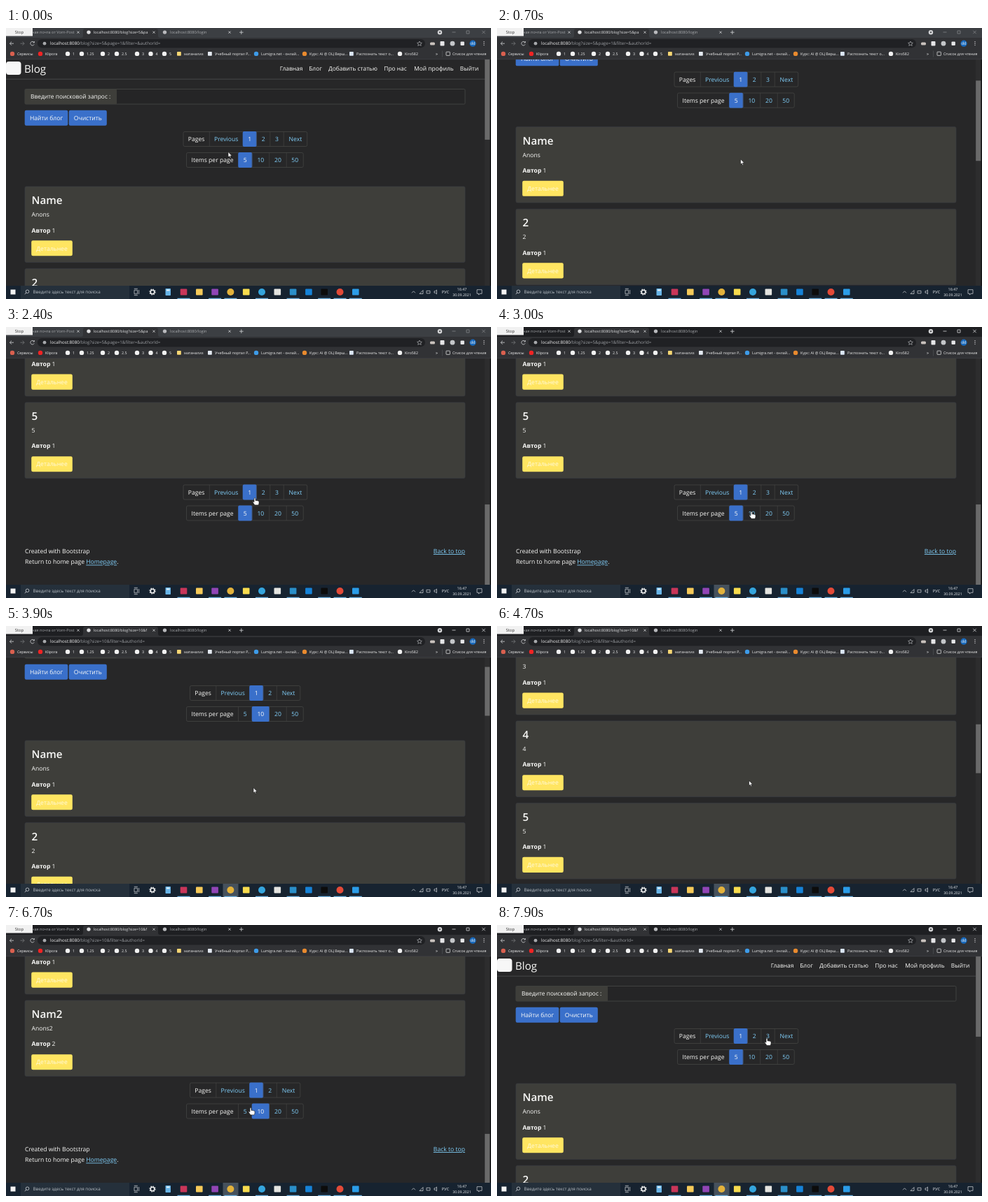
Recreate the animation shown at these times as an HTML page. Size 692 px wide and 388 px high, loop 8 s.

```html
<!DOCTYPE html>
<html lang="ru">
<head>
<meta charset="utf-8">
<title>Blog</title>
<style>
html, body { margin: 0; width: 100%; height: 100%; overflow: hidden; background: #272728; }
svg { display: block; width: 692px; height: 388px; font-family: "Open Sans", "Noto Sans", sans-serif; text-rendering: geometricPrecision; }
text { white-space: pre; }
</style>
</head>
<body>
<svg id="stage" viewBox="0 0 692 388"></svg>
<script>
const LOOP = 8000, STEP = 100;
const TOP = 45, BOTTOM = 369, VIEW = BOTTOM - TOP;
const CARD_TOP = 227, PITCH = 117.6;
const BODY = 8.6;
const BLUE = '#3a70ca', LINK = '#80cffa', WHITE = '#fafaf8', EDGE = '#484947', CARD = '#3e3e3a';
const stage = document.getElementById('stage');

function el(parent, tag, attrs = {}) {
  const node = document.createElementNS('http://www.w3.org/2000/svg', tag);
  for (const key in attrs) node.setAttribute(key, attrs[key]);
  parent.appendChild(node);
  return node;
}
const group = (parent, attrs) => el(parent, 'g', attrs);
const rect = (g, x, y, width, height, fill, rx = 0, more = {}) =>
  el(g, 'rect', { x, y, width, height, fill, rx, ...more });
const dot = (g, cx, cy, r, fill) => el(g, 'circle', { cx, cy, r, fill });
const line = (g, d, stroke = '#d5d6d8', width = 0.8) =>
  el(g, 'path', { d, stroke, 'stroke-width': width, fill: 'none' });
function text(g, value, x, y, size = BODY, fill = WHITE, more = {}) {
  const node = el(g, 'text', { x, y, 'font-size': size, fill, ...more });
  node.textContent = value;
  return node;
}
const MID = { 'text-anchor': 'middle' };

// Page content

function pager(g, y, x, cells, active) {
  const left = x;
  const width = cells.reduce((sum, cell) => sum + cell[1], 0);
  rect(g, left, y, width, 21, 'none', 2, { stroke: EDGE, 'stroke-width': 0.7 });
  cells.forEach(([label, w], i) => {
    const on = label === active;
    if (on) rect(g, x - 0.3, y - 0.4, w + 0.6, 21.8, BLUE, 2);
    else if (i) line(g, `M${x} ${y}v21`, EDGE, 0.6);
    text(g, label, x + w / 2, y + 13.6, BODY, i && !on ? LINK : WHITE, MID);
    x += w;
  });
}

function pagers(g, y, size) {
  const pages = size === 5 ? ['1', '2', '3'] : ['1', '2'];
  pager(g, y, size === 5 ? 253 : 262.5,
    [['Pages', 37.3], ['Previous', 47.7], ...pages.map(p => [p, 19.4]), ['Next', 33.5]], '1');
  pager(g, y + 30, 257.5,
    [['Items per page', 74], ['5', 19.5], ['10', 24.7], ['20', 24.5], ['50', 24]], String(size));
}

function button(g, label, x, y, width, fill, color = WHITE) {
  rect(g, x - 0.3, y - 0.3, width + 0.6, 22.1, fill, 2.2);
  text(g, label, x + width / 2, y + 14, BODY, color, MID);
}

function card(g, y, title, intro, author) {
  rect(g, 27, y, 628, 108.5, CARD, 2, { stroke: '#393d43', 'stroke-width': 0.6 });
  text(g, title, 36.5, y + 25, 15.2, WHITE, { 'font-weight': 600 });
  text(g, intro, 36.5, y + 43);
  const by = text(g, '', 36.5, y + 65.5);
  el(by, 'tspan', { 'font-weight': 700 }).textContent = 'Автор';
  by.append(' ' + author);
  button(g, 'Детальнее', 36.5, y + 77.5, 58, '#ffe561', '#fffae0');
}

function buildPage(parent, size) {
  const g = group(parent);
  rect(g, 0, 48, 21.5, 19, '#f7f7f7', 4);
  text(g, 'Blog', 26, 63.5, 15.2);
  [['Главная', 407], ['Блог', 441.5], ['Добавить статью', 495], ['Про нас', 555.5],
   ['Мой профиль', 610.5], ['Выйти', 661]].forEach(([label, x]) => text(g, label, x, 61, 8.4, WHITE, MID));
  line(g, 'M0 73.2H683', '#55565a', 0.7);

  rect(g, 27, 87.5, 628, 21.5, '#252526', 1.5, { stroke: EDGE, 'stroke-width': 0.8 });
  rect(g, 27, 87.5, 131, 21.5, CARD, 1.5);
  text(g, 'Введите поисковой запрос :', 92.2, 101.3, 8.4, WHITE, MID);
  button(g, 'Найти блог', 27, 118, 61, BLUE);
  button(g, 'Очистить', 90, 118, 53.5, BLUE);
  pagers(g, 148.5, size);

  for (let i = 0; i < size; i++) {
    const y = CARD_TOP + PITCH * i, n = String(i + 1);
    if (i === 0) card(g, y, 'Name', 'Anons', 1);
    else if (i === 9) card(g, y, 'Nam2', 'Anons2', 2);
    else card(g, y, n, n, 1);
  }
  const last = CARD_TOP + PITCH * (size - 1);
  pagers(g, last + 118, size);
  const under = { 'text-decoration': 'underline' };
  text(g, 'Created with Bootstrap', 27, last + 216);
  text(g, 'Back to top', 655, last + 216, BODY, LINK, { ...under, 'text-anchor': 'end' });
  const home = text(g, 'Return to home page ', 27, last + 231.5);
  el(home, 'tspan', { fill: LINK, ...under }).textContent = 'Homepage';
  home.append('.');
  return g;
}

// Browser frame

function buildBrowser(g) {
  const strip = rect(g, 0, 0, 692, 14, '#1e1f22');
  rect(g, 0, 14, 692, 31, '#313235');
  el(g, 'path', { d: 'M107 14q3 0 3-3V4q0-3 3-3H214q3 0 3 3v7q0 3 3 3Z', fill: '#313235' });
  text(g, 'ная почта от Vorn-Post', 37, 8.1, 5.5, '#a7a9ac');
  text(g, 'localhost:8080/login', 234, 8.1, 5.6, '#a7a9ac');
  dot(g, 118, 6.1, 2.7, '#dfe0e2');
  dot(g, 226.5, 6.1, 2.7, '#b9babd');
  const cross = (parent, x, y, r) =>
    line(parent, `M${x - r} ${y - r}l${2 * r} ${2 * r}m0 ${-2 * r}l${-2 * r} ${2 * r}`);
  [103, 211, 319].forEach(x => cross(g, x, 6.2, 1.6));
  line(g, 'M333 6.2h5.6m-2.8-2.8v5.6');
  const controls = group(g);
  line(controls, 'M636.5 6h5M657 4h4v4h-4Z');
  cross(controls, 681.5, 6, 2.2);
  dot(g, 619, 6.3, 3.2, '#d5d6d8');
  el(g, 'path', { d: 'M617.5 5.4h3l-1.5 2Z', fill: '#1e1f22' });

  rect(g, 45, 16, 553, 12.4, '#202124', 6.2);
  line(g, 'M11 22.2H5.5m2.5-2.6l-2.6 2.6 2.6 2.6');
  line(g, 'M20.5 22.2H26m-2.5-2.6l2.6 2.6-2.6 2.6', '#77797c');
  line(g, 'M40 20.6a2.8 2.8 0 1 0 .2 2.8M40.4 19v2h-2');
  dot(g, 55, 22.2, 2.4, '#a7a9ac');
  el(g, 'path', { d: 'M590 19l1 2.2 2.4.2-1.8 1.6.6 2.4-2.2-1.3-2.2 1.3.6-2.4-1.8-1.6 2.4-.2Z', fill: 'none', stroke: '#c5c7ca', 'stroke-width': 0.6 });
  rect(g, 605, 20.5, 7, 4, '#c9c2bd', 1.5);
  rect(g, 619.5, 19, 6, 6.5, '#e6e6e8', 1);
  dot(g, 637, 22.2, 3.4, '#c5c7ca');
  rect(g, 648.5, 19.5, 5.4, 5.4, '#e6e6e8', 1);
  dot(g, 666, 22.2, 4.6, '#1769bd');
  text(g, 'dd', 666, 24.2, 5.8, WHITE, MID);
  [19.8, 22.2, 24.6].forEach(y => dot(g, 682, y, 0.7, '#d5d6d8'));

  [['Сервисы', 16, '#d9604f'], ['Klipora', 56, '#f02424'], ['1', 95, ''], ['1.25', 115, ''], ['2', 145, ''],
   ['2.5', 165, ''], ['3', 194, ''], ['4', 213.5, ''], ['5', 233, ''], ['матанализ', 254, '#f7d774'],
   ['Учебный портал P...', 298, '#e4eaf2'], ['Lumigra.net - онлай...', 364, '#3e9be8'],
   ['Курс: AI @ ОЦ Верш...', 433, '#e98a2e'], ['Распознать текст о...', 500, '#dbe6f7'],
   ['Kiro582', 569, '#f1f1f1']].forEach(([label, x, color]) => {
    if (x === 254 || x === 298 || x === 500) rect(g, x - 10, 34, 5.8, 5.8, color, 0.8);
    else dot(g, x - 7, 36.9, 3.2, color || '#f1f1f1');
    text(g, label, x, 38.6, 5.3, '#f1f1f1');
  });
  text(g, '»', 613, 38.5, 6, '#f1f1f1');
  line(g, 'M622.5 32.5v9', '#55565a', 0.6);
  rect(g, 628, 34.2, 5.4, 5.2, 'none', 0.6, { stroke: '#f1f1f1', 'stroke-width': 0.7 });
  text(g, 'Список для чтения', 637, 38.6, 5.3, '#f1f1f1');
  line(g, 'M0 44.8H692', '#46474a', 0.5);

  rect(g, 0, 0, 38, 11.5, '#f1f1f1');
  text(g, 'Stop', 19, 7.7, 5.8, '#333', MID);
  return { strip, controls };
}

function buildTaskbar(g) {
  rect(g, 0, BOTTOM, 692, 19, '#172330');
  rect(g, 6.5, 374.5, 7, 7, '#f3f3f3');
  rect(g, 21, BOTTOM, 155, 19, '#25303b');
  el(g, 'circle', { cx: 30.5, cy: 377.3, r: 2.3, fill: 'none', stroke: '#d0d4d8', 'stroke-width': 0.8 });
  line(g, 'M28.8 379l-2 2.2');
  text(g, 'Введите здесь текст для поиска', 38.5, 380.3, 6.3, '#b9bfc5');
  line(g, 'M183 375.3h4.5v5.4H183ZM189.6 375v6M182.8 373.3h5M182.8 382.7h5', '#d8dbde', 0.7);
  const active = rect(g, 309.5, BOTTOM, 22, 19, '#46515c');
  el(g, 'circle', { cx: 209, cy: 378, r: 2.8, fill: 'none', stroke: '#f1f1f1', 'stroke-width': 1.5 });
  el(g, 'circle', { cx: 209, cy: 378, r: 4, fill: 'none', stroke: '#f1f1f1', 'stroke-width': 1.2, 'stroke-dasharray': '1.5 1.64' });
  rect(g, 227.5, 373, 7.5, 10, '#69b5e8', 0.8);
  rect(g, 229, 374.4, 4.5, 2, '#e8f3fb');
  ['#c93659', '#f6ca59', '#9145b6', '#e3b23c', '#f8dc4e', '#35a5dd', '#e4e4e0', '#2a8fc9',
   '#1683d8', '#0c0c0c', '#e34a38', '#2b9de8'].forEach((color, i) => {
    const x = 253.5 + 22.3 * i;
    if ([3, 5, 10].includes(i)) dot(g, x, 378, 5, color);
    else rect(g, x - 4.8, 373.4, 9.6, 9.2, color, 1);
    if ([0, 2, 3, 5, 7, 9, 10, 11].includes(i)) rect(g, x - 9, 386.8, 18, 1.2, '#72b6e4');
  });
  line(g, 'M579 379.3l2.5-2.5 2.5 2.5M590 380.5l5-5v5ZM600 376.3h5v3.6h-5ZM611 376.8h1.5l2-1.7v5.8l-2-1.7H611Z', '#d8dbde', 0.7);
  text(g, 'РУС', 627, 380.2, 5.7, '#eceef0', MID);
  text(g, '16:47', 650.5, 376, 5.4, '#eceef0', MID);
  text(g, '30.09.2021', 650.5, 384.2, 5.2, '#eceef0', MID);
  line(g, 'M672 374.7h7v5.6h-3l-1.5 1.8v-1.8H672Z', '#d8dbde', 0.7);
  return active;
}

// Assembly

rect(stage, 0, 0, 692, 388, '#272728');
const clip = el(el(stage, 'defs'), 'clipPath', { id: 'view' });
rect(clip, 0, TOP, 683, VIEW, '#000');
const viewport = group(stage, { 'clip-path': 'url(#view)' });
const pages = { 5: buildPage(viewport, 5), 10: buildPage(viewport, 10) };
rect(stage, 683, TOP, 7.6, VIEW, '#2d2d2e');
const thumb = rect(stage, 683.2, TOP, 7.2, 115, '#6a6a6a');
rect(stage, 690.6, TOP, 1.4, VIEW, '#141416');
const { strip, controls } = buildBrowser(group(stage));
const title = text(stage, '', 125, 8.1, 5.4, '#e3e4e6');
const address = text(stage, '', 63, 24.4, 6.2, '#9a9da1');
const host = el(address, 'tspan', { fill: '#f4f4f4' });
host.textContent = 'localhost:8080';
const path = el(address, 'tspan');
const activeTask = buildTaskbar(group(stage));

const cursor = group(stage);
const ink = { fill: '#fff', stroke: '#111', 'stroke-width': 0.6, 'stroke-linejoin': 'round' };
const arrow = el(cursor, 'path', { d: 'M0 0V7.4L1.7 5.9 2.9 8.6 4.1 8.1 3 5.5H5.4Z', ...ink });
const hand = el(cursor, 'path', {
  d: 'M-1 .8Q0-.6 1 .8V4Q2.2 3.2 2.9 4.2 4 3.6 4.6 4.6 6 4.2 6 5.8V7.5Q6 9 5 10.4H0Q-1.4 8.6-2.8 6.6-3.4 5.2-2.2 5.2L-1 6.2Z', ...ink
});

// Motion

const FOCUS = 3000; // the first click activates the window
const LOADS = [
  { at: 0, size: 5, query: 'size=5&page=1&filter=&authorId=' },
  { at: 3200, size: 10, query: 'size=10&filter=&authorId=' },
  { at: 7300, size: 5, query: 'size=5&filter=&authorId=' }
];
const SCROLL = [
  [0, 0], [500, 0], [1400, 384.6], [1900, 589.4], [3199, 589.4], [3200, 0],
  [3700, 0], [3900, 63], [5500, 824.6], [6300, 1177.4], [7299, 1177.4], [7300, 0]
];
const POINTER = [
  [0, 317, 177.5], [500, 345, 188], [1400, 356, 187], [2000, 356, 190], [2400, 355, 244.5],
  [2800, 363, 264], [3300, 363, 264], [3700, 354, 234], [3900, 353, 231.5], [5500, 366, 211],
  [6200, 365, 214], [6700, 349, 261.5], [7000, 342, 264], [7400, 342, 264], [7900, 385, 162]
];
const HANDS = [[2300, 3200], [6500, 7300], [7700, 8000]];

function sample(keys, t, column = 1) {
  const next = keys.findIndex(k => k[0] > t);
  if (next < 0) return keys[keys.length - 1][column];
  const a = keys[next - 1], b = keys[next];
  return a[column] + (b[column] - a[column]) * (t - a[0]) / (b[0] - a[0]);
}
const show = (node, on) => { node.style.display = on ? '' : 'none'; };

function draw(t) {
  const load = LOADS.filter(l => l.at <= t).pop();
  const scroll = sample(SCROLL, t);
  for (const size in pages) show(pages[size], +size === load.size);
  pages[load.size].setAttribute('transform', `translate(0 ${-scroll})`);

  const height = VIEW + (load.size === 5 ? 589.4 : 1177.4);
  thumb.setAttribute('y', TOP + scroll * VIEW / height);
  thumb.setAttribute('height', VIEW * VIEW / height);

  path.textContent = '/blog?' + load.query;
  title.textContent = ('localhost:8080/blog?' + load.query).slice(0, 29);

  const focused = t >= FOCUS;
  show(activeTask, focused);
  strip.setAttribute('fill', focused ? '#1e1f22' : '#3c3f43');
  controls.setAttribute('opacity', focused ? 1 : 0.45);

  const pointing = HANDS.some(([from, to]) => t >= from && t < to);
  show(arrow, !pointing);
  show(hand, pointing);
  cursor.setAttribute('transform', `translate(${sample(POINTER, t, 1)} ${sample(POINTER, t, 2)})`);
}

function tick() {
  const t = performance.now() % LOOP;
  draw(Math.floor(t / STEP) * STEP);
  requestAnimationFrame(tick);
}
tick();
</script>
</body>
</html>
```
